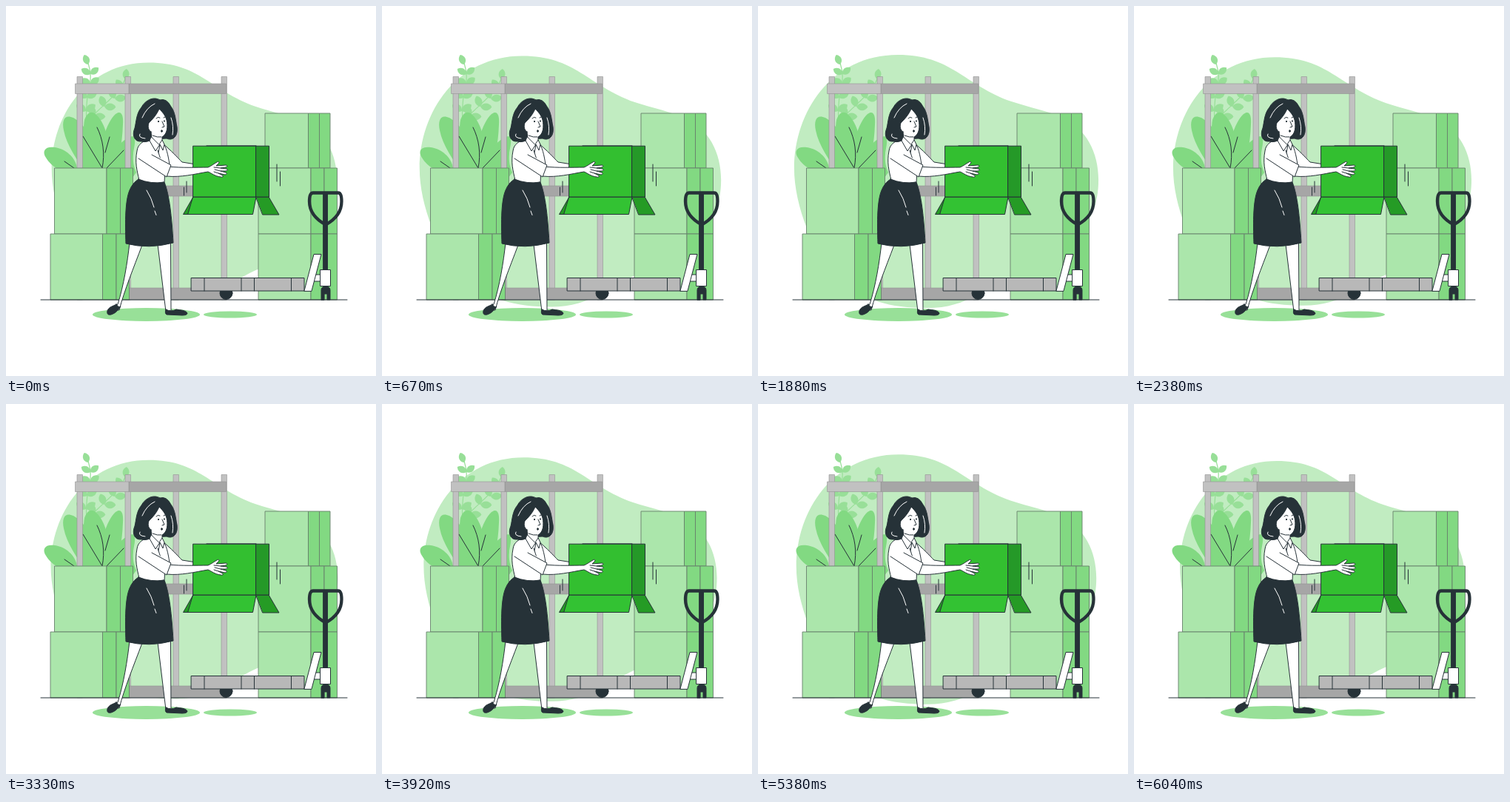
Write an HTML page that moves like this. It is 500 by 500 pixels and loops after 6.08 s.

```html
<!DOCTYPE html>
<html lang="en">
<head>
<meta charset="utf-8">
<title>Packing a box</title>
<style>
html, body { margin: 0; width: 100%; height: 100%; overflow: hidden; background: #fff; }
svg { display: block; width: 100vw; height: 100vh; }
.ink { stroke: #263238; stroke-width: 1; stroke-linecap: round; stroke-linejoin: round; }
.line { fill: none; }
.dark { fill: #263238; }
.white { fill: #fff; }
.shine { fill: none; stroke: #fff; }
.edge { stroke: #68806c; stroke-width: .9; }
</style>
</head>
<body>
<svg viewBox="0 0 500 500">
<defs>
  <path id="leaf" d="M0 0C-6-3-6.500-10-1-14C5-11 6-4 0 0Z"/>
  <g id="pair"><use href="#leaf" transform="rotate(-56)"/><use href="#leaf" transform="rotate(56)"/></g>
</defs>

<path id="blob" fill="#c1ecc1" d="M43 219C43 140 95 61 187 61C262 61 278 102 345 126C369 134 398 140 415 148C449 163 466 197 466 235C466 300 425 332 352 366C310 383 285 413 228 413C175 413 140 403 106 372C69 338 43 270 43 219Z"/>

<!-- plants -->
<g fill="#98df98">
  <path class="line" stroke="#98df98" stroke-width="1.200" d="M111 77Q117 96 112 112Q106 140 110 170M162 95C157 116 132 132 116 150L100 172"/>
  <use href="#leaf" transform="translate(111 79) rotate(-18)"/>
  <use href="#pair" transform="translate(114 92)"/>
  <use href="#pair" transform="translate(114 106) scale(1.050)"/>
  <use href="#pair" transform="translate(110 124) rotate(4) scale(1.100)"/>
  <use href="#pair" transform="translate(108 142) rotate(4) scale(1.100)"/>
  <use href="#leaf" transform="translate(161 99) rotate(12)"/>
  <use href="#pair" transform="translate(157 111) rotate(24)"/>
  <use href="#pair" transform="translate(147 125) rotate(34) scale(1.100)"/>
  <use href="#pair" transform="translate(133 136) rotate(40) scale(1.100)"/>
  <use href="#pair" transform="translate(119 149) rotate(40) scale(1.100)"/>
</g>
<g fill="#82d982">
  <path d="M96 219C94 204 80 193 66 191C53 189 48 196 54 205C58 212 65 218 72 221Z"/>
  <path d="M131 221C127 192 108 160 91 151C80 146 75 153 78 168C82 189 97 208 104 221Z"/>
  <path d="M136 221C143 188 135 158 121 146C115 141 109 145 106 154C102 176 112 207 121 221Z"/>
  <path d="M126 221C125 190 136 157 148 146C156 140 159 148 158 160C157 189 152 208 146 221Z"/>
  <path d="M134 221C141 197 159 178 171 176C177 179 173 190 172 200C171 210 173 218 176 225L168 236Z"/>
</g>
<path class="ink line" d="M79 210L92 219M104 176L130 219M159 195L136 219M123 164C131 180 134 199 130 219M140 177L134 198"/>

<g id="shelf" stroke="#929292" stroke-width=".6"></g>
<g id="boxes" class="edge"></g>

<path class="ink line" d="M47 397H461"/>
<g fill="#98e098">
  <ellipse cx="189.500" cy="417" rx="72.500" ry="9"/>
  <ellipse cx="303" cy="417" rx="36" ry="4.500"/>
</g>

<!-- pallet truck -->
<g class="ink">
  <circle class="dark" cx="297.500" cy="388" r="8.500"/>
  <path fill="#b8b8b8" d="M250.500 367.500H403V385H250.500ZM268 367.500V385M318 367.500V385M335.500 367.500V385M385.500 367.500V385"/>
  <path class="white" d="M412 363H426V372H412Z"/>
  <path class="white" d="M403 385L416 335.500H426L413 385Z"/>
  <path class="dark" d="M426 397V384Q426 379 432 379Q438 379 438 384V397H434V389H430V397Z"/>
  <path class="dark" d="M429 253H434.500V357H429Z"/>
  <path class="white" d="M425 356.500H438.500V378.500H425Z"/>
  <path class="line" style="stroke-width:4.300" d="M432 295.500C420 289 410 280 410 264Q410 252.500 415 252.500H449Q453.500 252.500 453.500 264C453.500 280 444 289 432 295.500Z"/>
</g>

<!-- legs and shoes -->
<g class="ink">
  <path class="white" d="M167 320C164 347 159 378 151 403L143 410L153 411C160 384 172 355 184 323Z"/>
  <path class="white" d="M205 322L216 413L223 412L222.500 320Z"/>
  <path class="dark" d="M149 403C145 406 139 406 137 412C136 416 138 418 142 417C149 415 152 410 155 406Q152 408 149 403Z"/>
  <path class="dark" d="M216 410C215 413 215 416 217 417L238 418Q245 418 245 415C243 411 236 411 230 410Q223 414 216 410Z"/>
</g>

<!-- torso -->
<g class="ink">
  <path class="white" d="M212 186C224 196 231 204 238 211L257 214V220H218Z"/>
  <path class="white" d="M195 180C185 182 178 187 177 196C174 211 177 223 180 235Q196 242 214 238L215 222L221 214C219 202 217 190 211 183Z"/>
  <path class="dark" d="M179 234Q196 241 214 238C221 256 224 285 226 320Q193 329 162 321C161 291 161 263 167 249Q171 239 179 234Z"/>
  <path class="shine" d="M190 249Q197 260 200 272M201 277L203 282.500"/>
  <path class="line" d="M205 195Q211 212 212 222"/>
</g>

<!-- carton -->
<g class="ink">
  <path fill="#259b25" d="M253 258L239.500 281.500H262V258Z"/>
  <path fill="#33c233" d="M253 258H338L333.500 281.500H246Z"/>
  <path fill="#259b25" d="M338 258H355L369 282H347Z"/>
  <path fill="#33bf30" d="M253 189.200H338V258H253Z"/>
  <path fill="#259928" d="M338 189.200H355.500V258H338Z"/>
  <path class="line" d="M271 188.900H338M366 214V237M370.500 224V243M244 237V252M240.500 245V256"/>
</g>

<!-- near arm and hand -->
<g class="ink">
  <path class="white" d="M219 217C239 219 256 218 273 218C278 216 281 213 285 211C288 209 289 212 286 214L284 216L297 215Q301 216 297 218L290 219L298 220Q301 222 297 223L290 223L297 225Q300 227 296 228L287 226L293 229Q294 232 290 231C282 230 278 226 273 224C255 227 237 232 217 230Z"/>
  <path class="line" d="M281 218L290 219M282 221L290 223M281 224L287 226"/>
  <path class="white" style="stroke:none" d="M178 200L217 231L223 215L194 196Z"/>
  <path class="line" d="M179 206L217 231L223 215L197 201"/>
</g>

<!-- head -->
<g class="ink">
  <path class="dark" d="M208 127C198 121 187 129 183 137C176 145 176 157 174 165C170 174 173 184 183 183Q191 185 197 180L217 179C226 183 233 175 231 163C229 154 229 144 223 136Q217 124 208 127Z"/>
  <path class="white" d="M196 170L197 180L204 192L211 184V177C218 173 219 163 217 154C215 147 211 143 207 139C203 148 198 153 193 158C191 164 193 168 196 170Z"/>
  <path class="white" d="M196 177L194 182L202 196L208 187L212 195L214 187L211 181L207 187Z"/>
  <path class="line" d="M208 188L206 198M203 152Q205 149 208 151M213 151L215 150M211 156L214 163L211 164M198 175Q205 178 210 177"/>
  <path class="shine" d="M184 151Q190 137 201 132M181 173Q178 178 188 179M223 151Q227 162 225 174"/>
  <ellipse class="dark" cx="206" cy="156" rx=".5" ry="1"/>
  <ellipse class="dark" cx="214" cy="155.500" rx=".4" ry=".9"/>
  <ellipse class="dark" cx="210.500" cy="169" rx=".8" ry="1.400"/>
</g>
</svg>
<script>
const rect = (x, y, w, h, fill) => `<path fill="${fill}" d="M${x} ${y}h${w}v${h}h${-w}z"/>`;

const carton = ([x, y, w, h, strip, fold]) =>
  rect(x, y, strip - x, h, '#abe6ab') +
  rect(strip, y, fold - strip, h, '#82d982') +
  rect(fold, y, x + w - fold, h, '#82d982');

document.getElementById('shelf').innerHTML =
  [96, 161, 226, 291].map(x => rect(x, 95.5, 7.5, 301.5, '#c1c1c1')).join('') +
  rect(166, 105, 131.5, 13.5, '#a6a6a6') +
  rect(93.5, 105, 72.5, 13.5, '#c1c1c1') +
  rect(166, 243, 125, 14, '#a6a6a6') +
  rect(166, 381, 132, 16, '#a6a6a6');

document.getElementById('boxes').innerHTML = [
  [65.5, 219, 106, 89, 136, 154.5],
  [60, 308, 106.5, 89, 130.5, 149],
  [350, 145, 88, 74, 408.5, 423.5],
  [341, 219, 106.5, 89, 412, 430],
  [341, 308, 106.5, 89, 412, 430]
].map(carton).join('');

// The backdrop breathes in straight ramps between scale 1 and 1.1.
const LOOP = 6080, turns = [-30, 1150, 3530, 4820, 6050, 7230];
const blob = document.getElementById('blob');

function draw(now) {
  const t = now % LOOP;
  const i = turns.findIndex(end => t < end) - 1;
  const p = (t - turns[i]) / (turns[i + 1] - turns[i]);
  const scale = (1 + 0.1 * (i % 2 ? 1 - p : p)) / 1.1;
  blob.setAttribute('transform', `translate(254.5 237) scale(${scale}) translate(-254.5 -237)`);
}

const start = performance.now();
function tick() {
  draw(performance.now() - start);
  requestAnimationFrame(tick);
}
tick();
</script>
</body>
</html>
```
